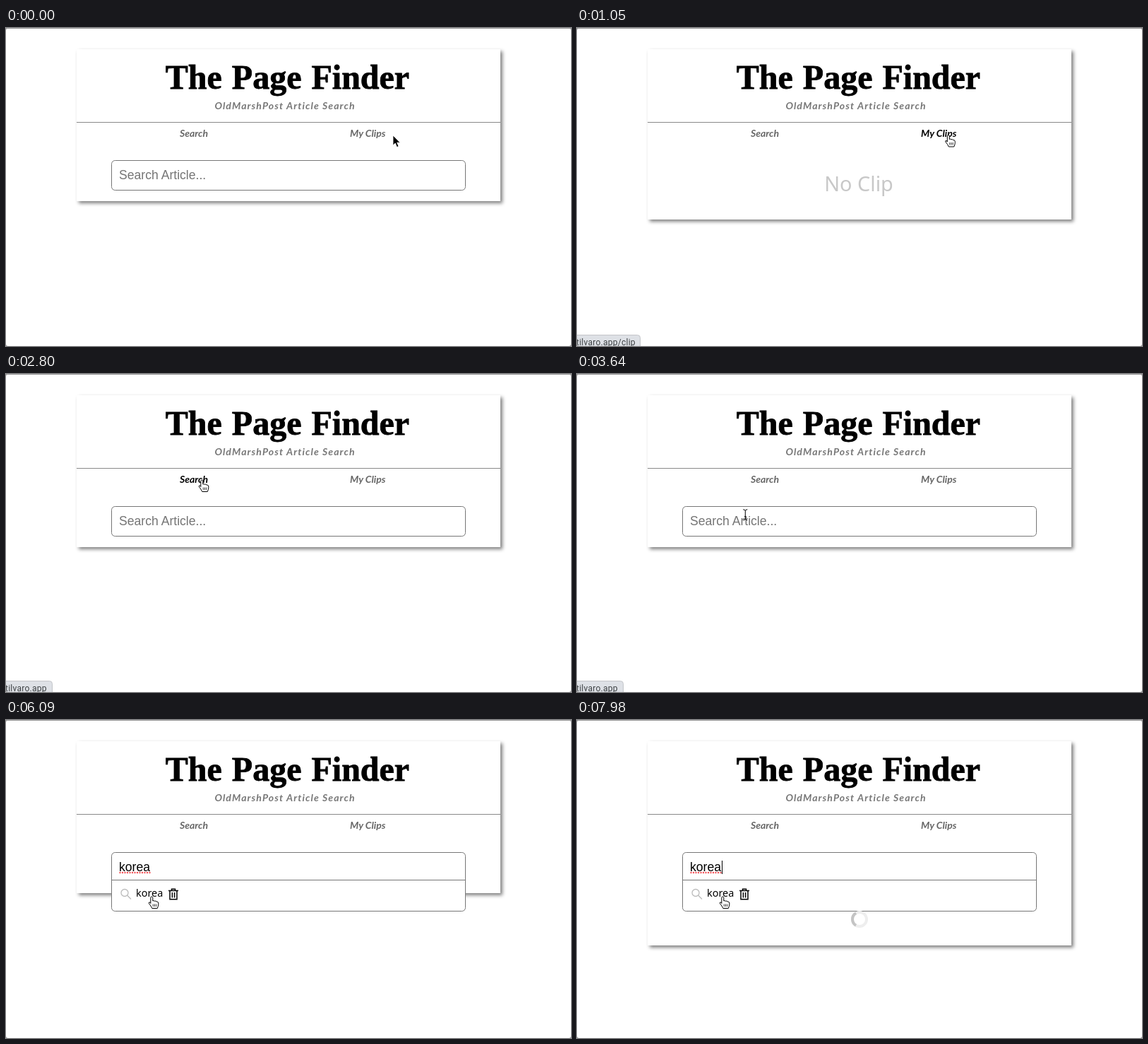
Recreate the animation shown at these times as an HTML page. Size 800 by 450 pixels, loop 8 s.

```html
<!DOCTYPE html>
<html lang="en">
<head>
<meta charset="utf-8">
<title>Article search</title>
<style>
  html, body { margin: 0; width: 100%; height: 100%; overflow: hidden; background: #999; }
  #stage { position: absolute; top: 1px; left: 0; width: 800px; height: 449px; overflow: hidden; background: #fff; border-radius: 2px 2px 3px 3px; }
  #panel { position: absolute; left: 100px; top: 29px; width: 600px; background: #fff; box-shadow: 3px 3px 5px gray; }
  svg { position: absolute; left: 0; top: -1px; }
  .title { font: bold 48px "Liberation Serif", serif; stroke: #000; stroke-width: .8; }
  .script { font: italic bold 14px Lato, sans-serif; fill: #666; }
  .sub { letter-spacing: 1.1px; fill: #777; }
  .input { font: 17.6px "Liberation Sans", sans-serif; }
  .noto { font: 14.4px "Noto Sans", sans-serif; }
  .empty { font-size: 28.8px; fill: #c8c8c8; }
  .status { font: 12px Roboto, sans-serif; letter-spacing: .25px; fill: #3c4043; }
  .box { fill: #fff; stroke: #767676; }
  .line { fill: none; stroke: #000; }
</style>
</head>
<body>
<div id="stage">
  <div id="panel"></div>
  <svg width="800" height="450">
    <text class="title" x="398.5" y="86" text-anchor="middle" word-spacing="2">The Page Finder</text>
    <text class="script sub" x="395" y="115" text-anchor="middle">OldMarshPost Article Search</text>
    <path d="M100 133.5H700" stroke="#888"/>
    <text class="script" id="searchLink" x="246" y="154">Search</text>
    <text class="script" id="clipsLink" x="487" y="154">My Clips</text>

    <text class="noto empty" id="noClip" x="399" y="231" text-anchor="middle">No Clip</text>

    <g id="searchPage">
      <rect class="box" id="field" x="149.5" y="187.5" width="501" rx="5"/>
      <text class="input" id="query" x="160" y="214"></text>
      <path id="spelling" d="M161.5 216H204" stroke="#f2555a" stroke-width="2.4" stroke-linecap="round" stroke-dasharray="0 3.5"/>
      <path id="caret" d="M.5 199V218" stroke="#000"/>
      <g id="history">
        <path d="M150 226.5H650" stroke="#767676"/>
        <g class="line" style="stroke:#bbb" stroke-width="1.3">
          <circle cx="168" cy="244.5" r="5"/>
          <path d="M171.7 248.2L177 253.5"/>
        </g>
        <text class="noto" x="184" y="250">korea</text>
        <path class="line" stroke-width="1.5" d="M230 241.5H244M234.5 241V239.2H239.5V241M232 242V253.8H242V242M235.4 244V251.5M238.6 244V251.5"/>
      </g>
      <g id="spinner" class="line" stroke-width="4">
        <circle r="10" style="stroke:#eee"/>
        <path d="M-5 8.66A10 10 0 0 1 -5 -8.66" style="stroke:#c4c4c4"/>
      </g>
    </g>

    <g id="status">
      <rect id="statusBox" x="-6.5" y="434.5" height="30" rx="4" fill="#dee1e6" stroke="#c3c5c9"/>
      <text class="status" id="statusText" x="-1" y="448.5"></text>
    </g>

    <circle id="ring" class="line" stroke-width="1.5" opacity=".5"/>
    <g id="cursor">
      <path id="arrow" d="M0 0V14L3.2 11 5.5 16.5 8 15.5 5.7 10.2H10Z" stroke="#fff" stroke-width=".8"/>
      <g id="hand" stroke="#000" transform="translate(.8 0)">
        <path fill="#fff" d="M-2 1.5Q-2 0 -.5 0Q1 0 1 1.5V6Q2 5 3.5 6.3Q5 5.5 6.3 7Q8.5 6.5 9 9V11Q9 13 7.5 16.5H0Q-1.5 13 -4.5 9.5Q-5 7.5 -3 8L-2 9.5Z"/>
        <path d="M1.5 10.5V14M3.7 10.5V14M5.9 10.5V14" stroke-width=".8"/>
      </g>
      <path id="beam" class="line" d="M-3 -7.5Q0 -7.5 0 -5.5Q0 -7.5 3 -7.5M0 -5.5V5.5M-3 7.5Q0 7.5 0 5.5Q0 7.5 3 7.5M-1.5 2.5H1.5"/>
    </g>
  </svg>
</div>
<script>
const LOOP = 8000, STEP = 70;
const $ = id => document.getElementById(id);
const show = (id, on) => $(id).style.display = on ? "" : "none";
const clamp = v => Math.min(1, Math.max(0, v));
const during = (t, spans) => spans.some(([from, to]) => t >= from && t < to);

// Pointer moves: start, end, target x, target y
const START = [548, 152];
const MOVES = [
  [280, 560, 525.5, 151.5],
  [1680, 2310, 277, 150],
  [3360, 3850, 233, 206],
  [4690, 5040, 206, 250]
];
// Clicks: time, ring radius
const CLICKS = [[700, 30], [2660, 30], [4060, 16.5], [5390, 30]];
const CARET = [[4200, 4690], [5180, 5530], [5530, 6090], [6580, 7140], [7630, LOOP]];

function pointerAt(t) {
  let [x, y] = START;
  for (const [from, to, toX, toY] of MOVES) {
    const k = 1 - (1 - clamp((t - from) / (to - from))) ** 2.5;
    x += (toX - x) * k;
    y += (toY - y) * k;
  }
  return [x, y];
}

function statusOpacity(t) {
  if (t < 2240) return clamp((t - 630) / 200) * clamp((2250 - t) / 200);
  return clamp((3850 - t) / 200);
}

function drawPointer(t) {
  const [x, y] = pointerAt(t);
  const overClips = x > 487 && x < 537 && y < 157;
  const overSearch = x < 281 && y < 157;
  const overField = y > 187 && y < 227;
  const overLink = overClips || (x < 287 && y < 157) || y > 236;
  $("cursor").setAttribute("transform", `translate(${x} ${y})`);
  show("hand", overLink);
  show("beam", overField);
  show("arrow", !overLink && !overField);
  $("clipsLink").style.fill = overClips ? "#000" : "";
  $("searchLink").style.fill = overSearch ? "#000" : "";

  const click = CLICKS.find(([at]) => t >= at && t < at + 140);
  show("ring", click);
  if (click) {
    $("ring").setAttribute("cx", x);
    $("ring").setAttribute("cy", y);
    $("ring").setAttribute("r", click[1]);
  }
}

function draw(t) {
  const clips = t >= 840 && t < 2800;
  const open = t >= 4200, filled = t >= 5530, loading = t >= 6650;

  $("panel").style.height = (clips ? 241 : loading ? 289 : 215) + "px";
  show("noClip", clips);
  show("searchPage", !clips);
  show("history", open);
  $("field").setAttribute("height", open ? 83 : 42);
  $("query").textContent = filled ? "korea" : "Search Article...";
  $("query").style.fill = filled ? "#000" : "#757575";
  show("spelling", filled);
  show("caret", during(t, CARET));
  $("caret").setAttribute("transform", `translate(${filled ? 205 : 160} 0)`);
  show("spinner", loading);
  $("spinner").setAttribute("transform", `translate(400 282) rotate(${(t - 7980) / 1100 * 360})`);

  const home = t >= 2240;
  $("status").style.opacity = statusOpacity(t);
  $("statusText").textContent = home ? "tilvaro.app" : "tilvaro.app/clip";
  $("statusBox").setAttribute("width", home ? 72 : 96);
  drawPointer(t);
}

function tick() {
  const t = performance.now() % LOOP;
  draw(Math.floor(t / STEP) * STEP);
  requestAnimationFrame(tick);
}
tick();
</script>
</body>
</html>
```
